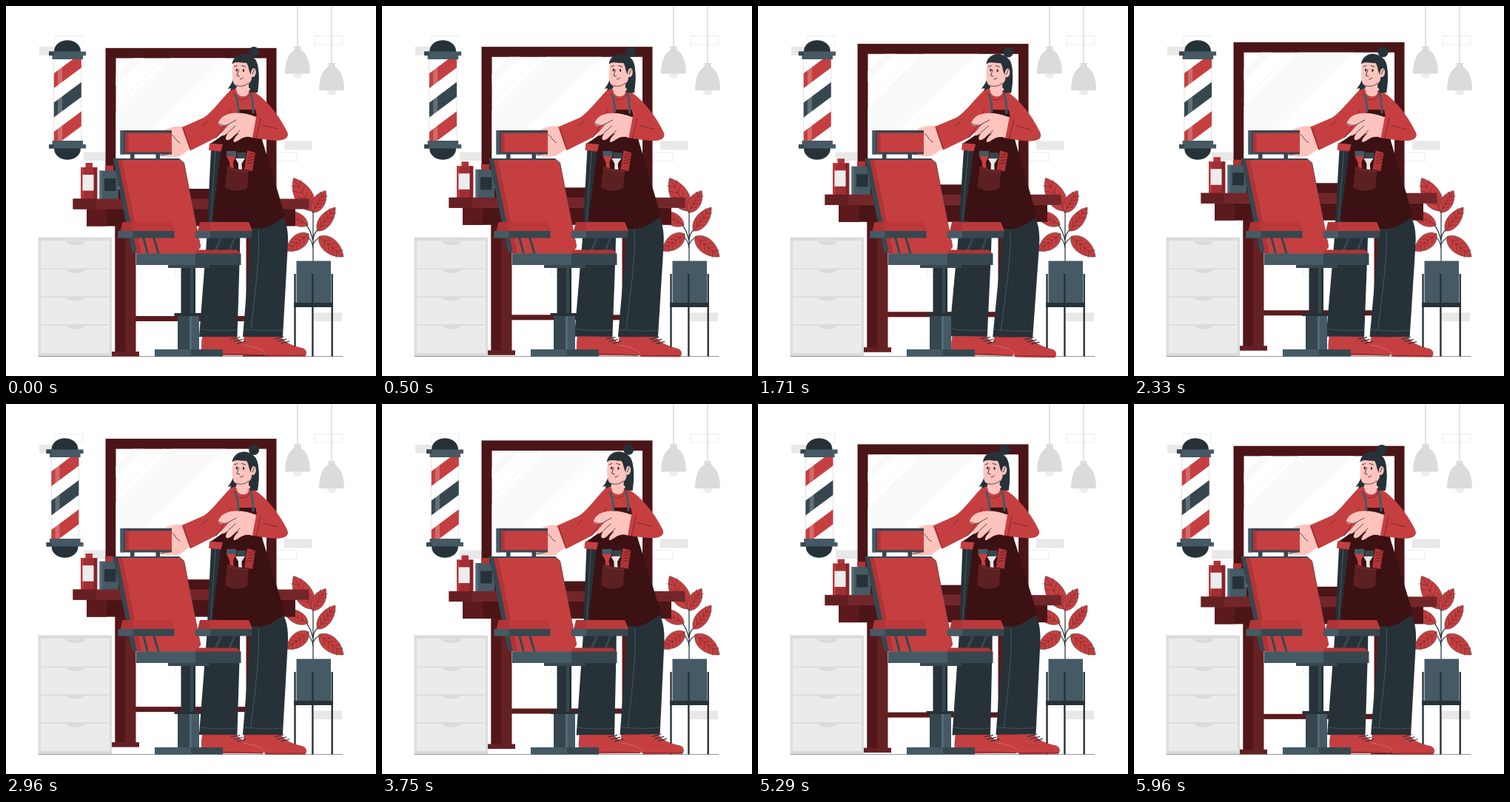
Recreate the animation shown at these times as an HTML page. Size 500 px wide and 500 px high, loop 6 s.

```html
<!DOCTYPE html>
<html lang="en">
<head>
<meta charset="utf-8">
<title>Barber shop</title>
<style>
html, body { margin: 0; width: 100%; height: 100%; overflow: hidden; background: #fff; }
svg { display: block; width: 100vw; height: 100vh; }
</style>
</head>
<body>
<svg id="stage" viewBox="0 0 500 500"></svg>
<script>
const RED = '#c63f40', RED2 = '#b03437', SKIN = '#ffc3bd', INK = '#263238',
  SLATE = '#37474f', STEEL = '#455a64', WINE = '#5c1a1d', WINE2 = '#73262a',
  WINE3 = '#4b1518', APRON = '#3b1113', PALE = '#ebebeb', GREY = '#dbdbdb';

const rect = (x, y, x2, y2, fill, extra = '') =>
  `<rect x="${x}" y="${y}" width="${x2 - x}" height="${y2 - y}" fill="${fill}" ${extra}/>`;
const shape = (d, fill, extra = '') => `<path d="${d}" fill="${fill}" ${extra}/>`;
const line = (d, color = INK, width = 1) =>
  `<path d="${d}" fill="none" stroke="${color}" stroke-width="${width}" stroke-linecap="round" stroke-linejoin="round"/>`;
const ellipse = (x, y, rx, ry, fill) => `<ellipse cx="${x}" cy="${y}" rx="${rx}" ry="${ry}" fill="${fill}"/>`;
const brick = (x, y, x2, y2) => rect(x, y, x2, y2, 'none', 'stroke="#ededed"');
const group = (id, ...parts) => `<g id="${id}">${parts.join('')}</g>`;

function lamp(x, y) {
  return line(`M${x} 0V${y}`, '#cfcfcf', 1.2) +
    ellipse(x, y + 37, 6.5, 6.5, '#ededed') +
    rect(x - 4.5, y, x + 4.5, y + 8, GREY) +
    shape(`M${x - 4.5} ${y + 5}C${x - 13} ${y + 10} ${x - 17} ${y + 22} ${x - 17} ${y + 37}H${x + 17}C${x + 17} ${y + 22} ${x + 13} ${y + 10} ${x + 4.5} ${y + 5}Z`, GREY);
}

function background() {
  return brick(66, 40.5, 104, 52) + rect(45, 55, 84, 66.5, '#e8e8e8') +
    rect(105, 197.5, 143, 209, '#e8e8e8') + brick(417.5, 40.5, 455, 52) +
    rect(376, 182.5, 413.5, 194.5, '#e8e8e8') + brick(355, 197.5, 393, 209.5) +
    rect(416, 414.5, 454, 426, '#e8e8e8') + brick(229, 352, 267, 364) +
    lamp(394, 54.5) + lamp(440, 77) + line('M44 473.5H455', INK, .5);
}

function cabinet() {
  let s = rect(43.5, 312.5, 143, 473, GREY) + rect(47, 317, 140, 469, PALE);
  for (let i = 0; i < 4; i++) {
    const y = 317.5 + i * 37.8;
    if (i) s += line(`M48 ${y}H139`, GREY, 1.6);
    s += shape(`M80 ${y}H107C104 ${y + 7.5} 83 ${y + 7.5} 80 ${y}Z`, GREY);
  }
  return s;
}

function pole() {
  const stripe = (y, fill) => shape(`M64 ${y}L103 ${y - 29}V${y - 9}L64 ${y + 20}Z`, fill);
  return shape('M65 62C65 41 101 41 101 62Z', INK) + shape('M65 192C65 213 101 213 101 192Z', INK) +
    rect(64.8, 71, 101.8, 183, '#fff', 'stroke="#d5d5d5" stroke-width=".7"') +
    `<clipPath id="tube">${rect(64.8, 71, 101.8, 183, '#fff')}</clipPath><g clip-path="url(#tube)">` +
    stripe(91.5, RED) + stripe(131, SLATE) + stripe(170.5, RED) +
    rect(70, 71, 76, 183, '#fff', 'opacity=".22"') + '</g>' +
    rect(58, 61.5, 108, 67, STEEL) + rect(62.5, 67, 104, 72, STEEL) +
    rect(62.5, 182, 104, 187, STEEL) + rect(58, 187, 108, 192.5, STEEL) +
    rect(58, 61.5, 65, 67, SLATE) + rect(58, 187, 65, 192.5, SLATE);
}

function leaf(x, y, tx, ty, w) {
  const dx = tx - x, dy = ty - y, len = Math.hypot(dx, dy), ux = dx / len, uy = dy / len;
  const at = (t, side) => `${(x + dx * t - uy * side).toFixed(1)} ${(y + dy * t + ux * side).toFixed(1)}`;
  let veins = `M${x} ${y}L${at(.93, 0)}`;
  for (let t = .2; t < .75; t += .17)
    for (const side of [-1, 1]) veins += `M${at(t, 0)}L${at(t + .15, side * w * .55)}`;
  return shape(`M${x} ${y}C${at(.15, w)} ${at(.65, w * 1.15)} ${tx} ${ty}C${at(.65, -w * 1.15)} ${at(.15, -w)} ${x} ${y}Z`,
    RED, `stroke="${INK}" stroke-width=".5"`) + line(veins, '#541d22', .45);
}

function plant() {
  return line('M415 346V270M415 318Q415 307 422 302M415 318Q412 302 404 294M415 322Q419 314 426 312M415 328Q414 314 404 310', INK, 1.2) +
    leaf(414, 277, 388.5, 232.5, 15) + leaf(414, 279, 432, 249.5, 10.5) +
    leaf(421, 304, 445, 272, 10.5) + leaf(408, 296, 374, 278, 10.5) +
    leaf(409, 308, 379, 331, 12) + leaf(423, 311.5, 456, 339, 12.5) +
    rect(392.5, 344.5, 439, 401, STEEL) + rect(389, 401, 442, 407, INK) +
    rect(389.3, 362, 391.7, 473.5, INK) + rect(413.2, 362, 415.6, 473.5, INK) + rect(439.5, 362, 441.9, 473.5, INK);
}

function vanity() {
  return rect(134.5, 56.8, 365.5, 261, WINE3) +
    rect(148.5, 70.5, 352, 247, '#fff') +
    shape('M222 70.5H297L148.5 214V143Z', '#fafafa') + shape('M172 70.5H187L148.5 108V94Z', '#f9f9f9') +
    line('M148.5 134L214 70.5', '#f5f5f5') +
    // bottles
    rect(107.5, 212, 117, 219, RED2) + rect(101, 218, 123.2, 261, '#a12e33') + rect(118.5, 218, 123.2, 261, '#882329') +
    rect(101, 218, 105, 261, '#b8393c') + rect(103.5, 228, 118.5, 249.5, '#ededed') +
    rect(134, 215.5, 145, 223, RED2) + rect(126.5, 222.5, 152, 261, STEEL) +
    rect(126.5, 222.5, 130, 261, '#536b76') + rect(133, 233, 148.5, 250, INK) +
    // table
    rect(324.5, 297, 351, 468, WINE) + rect(320, 467, 356, 473.5, WINE) +
    rect(175, 419, 325, 426, WINE) +
    rect(147.5, 297, 175.5, 468, '#642023') + rect(147.5, 297, 161, 468, '#541719') +
    rect(143, 467, 180, 473.5, '#642023') +
    rect(109, 274, 391, 297.5, WINE3) + rect(109, 274, 136, 297.5, WINE) +
    rect(90.5, 260.5, 409.5, 274.5, WINE2) + rect(90.5, 260.5, 122, 274.5, '#651f22');
}

function head() {
  return shape('M309 90C308 99 304 107 299.5 112L304 111L303 114L310 112L320 104L330 112L329 117L340 117C343 98 342 82 337 72Z', INK) +
    ellipse(335, 62, 7, 7, INK) +
    shape('M311 104L312 117C315 124 326 124 328 117L328 99Z', SKIN) +
    shape('M307.5 76C305 87 305 99 308 105C313 112 327 110 331 101L336 95C340 89 336 82 331 83L324 72Z', SKIN) +
    shape('M305.5 79C306 70 314 64 323 64.5C334 66 341 74 341 87C342 99 341 109 339 117C334 115 331 111 330 105C332 101 332 97 332 94C327 88 329 82 325 77C317 77 309 74 305.5 79Z', INK) +
    shape('M331 95C330 84 336 81 337.5 87C338.5 93 335 98 331 95Z', SKIN) +
    line('M333 92L335.5 86M308.5 82L312.5 80.5M318.5 80.5L323.5 82M314.5 86L312 94L315.5 95M316.5 99Q319 98.5 320.5 97', INK, .9) +
    ellipse(311.8, 86.5, 1.2, 2, INK) + ellipse(321, 87, 1.2, 2, INK) +
    line('M311 107.5Q321 110.5 328 104', '#3e282c', .8);
}

function legs() {
  const shoe = d => shape(d, RED, 'stroke="#86252c" stroke-width=".5"');
  return shape('M277 194H292L345 290L374 284C381 295 382 312 380.5 330L374 447H320L329.5 330L329 301H316.5L316 332L312.5 447H261L271 318Z', INK) +
    line('M341 303C344 335 336 390 331 437M283 196L276 300', '#546a75', .7) +
    line('M263 437Q290 440 312 438M321 437Q350 440 374 438', '#546a75', .6) +
    shoe('M265.5 447C264 455 264 463 265 472H347C350 469 349 464 345 463C330 460 318 456 311 447Z') +
    shoe('M322 447L321 458C332 461 348 462 349 471L352 473.5H404C407 470 406 465 402 463C389 460 378 456 371 447Z') +
    line('M266 470L320 470.5L346 472', '#6f2027', .7) +
    line('M321 458C335 461 350 463 349.5 472', '#ef9a9a', .6) + line('M350 472L404 472', '#6f2027', .7) +
    line('M304 450L316 447.5M308 453L320 450.5M313 456L324 453M363 450L375 447M367 453L379 450M372 456L383 453', INK, 1.2);
}

function woman() {
  return legs() +
    // far hand and torso
    shape('M240 163C230 162 220 164 214 168L210 193L208 203C219 204 226 205 235 203L249 193Z', SKIN) +
    line('M224 174C229 177 229 182 235 185M209 202L220 200', INK, .8) +
    shape('M304 113C290 127 279 143 267 151L237.5 164L249 195.5L284 178L304 160L307 184H346L345 178L360 181C375 183 383 178 380 170C370 149 353 128 337 117L328 113C328 124 315 124 311 112Z', RED) +
    line('M240 166L249 193M304 140Q298 160 284 178M272 156L266 162', '#6c2029', .8) +
    line('M308 118C312 130 327 130 331 117', '#7d252c', .8) +
    // apron
    shape('M314 140H337L347 184L377 283Q364 296 345 301Q310 299 279 290L291 190L276 186Q284 181 292 175L306 162Z', APRON) +
    shape('M275 185.5L293 187L290.5 196.5L274 195Z', RED) +
    line('M310 120Q314 130 314 143M331 119Q334 130 334 144', STEEL, 3) +
    // tools and pocket
    shape('M326 195L337 198L333 223L322 221Z', RED2) + line('M328 201L336 199M327 205L335 203M327 209L335 207M326 213L334 211', '#5e191e', .8) +
    rect(298, 196, 311, 203, STEEL) + shape('M298 203H311L307 211L308 222H303L302 211Z', RED) +
    rect(312, 198, 324, 206, SLATE) + shape('M310 206H323L318.5 213L319 222H314L314 213Z', '#e7e7e7') +
    shape('M299 216Q312 222 328 221L326 246Q311 254 296 245Z', '#5d2022') +
    line('M299 219Q313 224 327 224', '#81383a', .7) +
    // near arm
    shape('M337 149L349 150C365 151 378 163 381 174C380 183 366 182 354 181L333 178Z', RED) +
    shape('M338 150C324 144 307 143 298 147C292 149 288 154 286.5 159C290 164 298 162 302 159C296 166 291 171 291 175C294 176 297 174 300 171C297 177 296 179 298 181C304 183 309 172 315 172C310 176 306 182 308 184C314 184 320 173 333 178Z', SKIN) +
    line('M302 159L311 154M300 171L310 162M306 178L316 168M287 159Q296 164 302 159', INK, .8) +
    line('M344 152Q342 165 338 178M347 161L366 166', '#6c2029', .8) +
    head();
}

function armrest(x) {
  return shape(`M${x + 6} 292H${x + 72}L${x + 77} 304.5H${x + 3}Z`, RED2) +
    shape(`M${x + 20} 292H${x + 72}L${x + 77} 304.5H${x + 20}Z`, '#bb393b') +
    rect(x, 304, x + 76, 313.5, SLATE) + rect(x, 304, x + 20, 313.5, STEEL);
}

function chair() {
  return rect(168, 199, 173.5, 208, SLATE) + rect(202.5, 199, 208, 208, SLATE) +
    rect(154.5, 168, 224, 200.5, SLATE) + rect(154.5, 168, 159, 200.5, STEEL) +
    rect(161, 171.5, 224, 197.5, RED) + rect(161, 171.5, 166, 197.5, RED2) +
    line('M291 313L283 330M309 313L302 330', SLATE, 3) +
    shape('M144.5 206H234L241 212L263 325L257 334.5H177L170 332Z', SLATE) +
    shape('M151 208H235L240 212L263 325L257 334.5H177Z', RED2) +
    shape('M157 208H235L240 212L263 325L257 334.5H183Z', RED) +
    line('M186 314L191 333M200 314L206 334', SLATE, 3) +
    armrest(151.5) + armrest(256) +
    shape('M258 329.5H312L317 335H256Z', RED2) +
    rect(176, 334.5, 256, 350, STEEL) + rect(256, 334.5, 317.5, 350, SLATE) +
    rect(219, 350, 275, 354, SLATE) +
    rect(236.5, 354, 256, 416, INK) + rect(249, 354, 253, 416, SLATE) +
    rect(232, 419, 261, 465, SLATE) + rect(248, 419, 251, 465, '#546a75') + rect(251, 419, 261, 465, STEEL) +
    rect(227.5, 415, 264, 419, INK) +
    rect(201, 464, 293, 473.5, SLATE) + rect(201, 464, 250, 473.5, STEEL);
}

document.getElementById('stage').innerHTML = background() + cabinet() + group('pole', pole()) +
  plant() + group('vanity', vanity()) + group('woman', woman()) + chair();

const PERIOD = 6000;
const SHAKE = [0, -1, 2, -4, 4, -4, 4, -4, 2, -1, 0];
const parts = Object.fromEntries(['pole', 'vanity', 'woman'].map(id => [id, document.getElementById(id)]));

function shakeAt(p) {
  const i = Math.floor(p * 10), f = p * 10 - i;
  return SHAKE[i] + (SHAKE[i + 1] - SHAKE[i]) * f;
}

// Triangle wave: 0, 1, 0, -1 at the quarters.
const sway = p => p < .25 ? p * 4 : p < .75 ? 2 - p * 4 : p * 4 - 4;

function draw() {
  const p = performance.now() % PERIOD / PERIOD;
  parts.pole.setAttribute('transform', `translate(${shakeAt(p)} 0)`);
  parts.vanity.setAttribute('transform', `translate(0 ${-10 * (1 - Math.abs(2 * p - 1))})`);
  parts.woman.setAttribute('transform', `rotate(${sway(p)} 307.5 264.5)`);
  requestAnimationFrame(draw);
}
draw();
</script>
</body>
</html>
```
